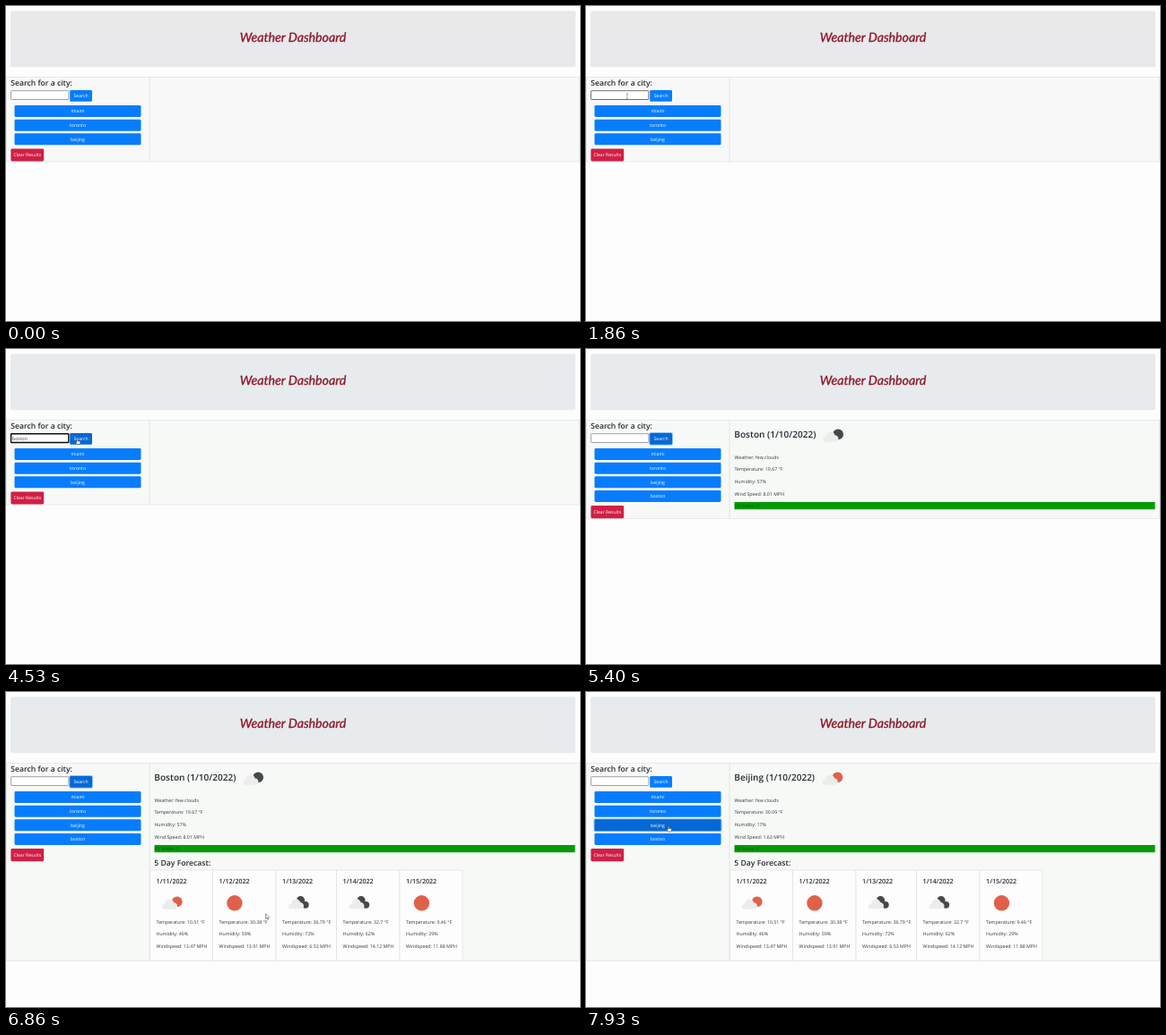
Write an HTML page that moves like this. It is 640 px wide and 352 px high and loops after 8000 ms.

```html
<!DOCTYPE html>
<html lang="en">
<head>
<meta charset="utf-8">
<title>Weather Dashboard</title>
<style>
  html, body { margin: 0; width: 100%; height: 100%; overflow: hidden; background: #fdfdfd; }
  svg { display: block; width: 100vw; height: 100vh; }
  text { font-family: "Open Sans", "Noto Sans", sans-serif; font-size: 5.25px; fill: #33383d; text-rendering: geometricPrecision; white-space: pre; }
  .title { font: italic 400 14.2px Lato, sans-serif; fill: #8d1a2b; stroke: #8d1a2b; stroke-width: .35; text-anchor: middle; }
  .h { font-weight: 600; fill: #262b30; }
  .btn { font-size: 5.1px; fill: #fff; text-anchor: middle; }
</style>
</head>
<body>
<svg id="stage" viewBox="0 0 640 352" preserveAspectRatio="none"></svg>
<script>
const LOOP = 8000;
const BLUE = [7, 125, 254], DEEP = [5, 104, 214];
const SUN = '#e0614a', DARK = '#47484b';

// Moments of the session, in ms
const T = {
  tint: 2130, inputHover: 1700, focus: 1930, searchHover: 4330, submit: 4900,
  current: 5130, forecast: 5530, icons: 5860, bostonHover: 7260, beijingHover: 7390,
  pick: 7530, beijing: 7660
};
const KEYS = [2860, 2930, 3060, 3130, 3260, 3400];
const CITIES = ['miami', 'toronto', 'beijing', 'boston'];
const NOW = {
  boston: { name: 'Boston', temp: '19.67', hum: 57, wind: '8.01', disc: DARK },
  beijing: { name: 'Beijing', temp: '30.09', hum: 17, wind: '1.63', disc: SUN }
};
const EDGES = [160.5, 230.5, 301, 368.5, 439, 509];
const DAYS = [
  ['10.51', 46, '13.47', 'few'], ['30.38', 59, '13.91', 'clear'], ['36.79', 72, '6.53', 'broken'],
  ['32.7', 62, '14.12', 'broken'], ['9.46', 29, '11.88', 'clear']
];

// Pointer stops: time, x, y
const PATHS = [
  [[760, 574, 2], [900, 560, 15], [1040, 530, 40], [1260, 378, 80], [1400, 228, 97], [1700, 62, 100], [1900, 42, 101]],
  [[4130, 42, 101], [4400, 78, 101], [4530, 79.5, 100], [5060, 80, 100], [5220, 96, 112]],
  [[5560, 165, 150], [5900, 225, 178], [6200, 231, 180], [6400, 262, 208], [6660, 318, 252],
   [6860, 290, 248], [7100, 165, 205], [7260, 100, 168], [7400, 91.8, 150], [8000, 92, 149.5]]
];

const text = (x, y, s, cls = '', size = 0, extra = '') =>
  `<text x="${x}" y="${y}" class="${cls}"${size ? ` style="font-size:${size}px"` : ''} ${extra}>${s}</text>`;
const rect = (x, y, w, h, fill, extra = '') =>
  `<rect x="${x}" y="${y}" width="${w}" height="${h}" fill="${fill}" ${extra}/>`;
const disc = (x, y, r, fill) => `<circle cx="${x}" cy="${y}" r="${r}" fill="${fill}"/>`;
const clamp = v => Math.max(0, Math.min(1, v));
const fade = (t, from) => clamp((t - from) / 150);
const blue = p => `rgb(${BLUE.map((c, i) => Math.round(c + (DEEP[i] - c) * p))})`;

function button(x, y, w, h, label, fill, ring) {
  const halo = ring ? rect(x - 1, y - 1, w + 2, h + 2, '#268fff', 'rx="2.2" opacity=".5"') : '';
  return halo + rect(x, y, w, h, fill, 'rx="1.4"') + text(x + w / 2, y + h / 2 + 1.9, label, 'btn');
}

function cloud(fill) {
  return `<path fill="${fill}" d="M-7.6 7C-12 7-12.300 1.200-7.600.6C-7-5.600 1-6 2.400-.4C7.300-.6 7.300 7 2.800 7Z"/>`;
}

function icon(x, y, kind, color = SUN) {
  const shapes = {
    clear: () => disc(0, 0, 8.7, color),
    few: () => disc(5.8, -1.5, 5.9, color) + cloud('#ececec'),
    broken: () => disc(3, -3, 4.7, DARK) + disc(8.4, 2, 3.9, DARK) +
      `<g stroke="#fdfdfd" stroke-width=".8">${cloud('#ececec')}</g>`
  };
  return `<g transform="translate(${x} ${y})">${shapes[kind]()}</g>`;
}

function header(t) {
  return rect(5, 5.5, 630, 62.7, t < T.tint ? 'url(#grey)' : '#e7ebee', 'rx="2"') +
    text(320, 40.3, 'Weather Dashboard', 'title');
}

function panels(t) {
  const bottom = t < T.submit ? 174 : t < T.forecast ? 189.5 : 300.5;
  const fill = t < T.tint ? '#f8f8f8' : '#f7f9f6';
  const line = 'stroke="#dfe3e3" stroke-width=".7"';
  return rect(.4, 79.5, 159.7, bottom - 79.5, fill, line) +
    rect(160.1, 79.5, 479.5, bottom - 79.5, fill, line);
}

function input(t) {
  const focused = t >= T.focus && t < T.submit;
  const stroke = focused ? '#0c0c0c' : t >= T.inputHover && t < T.focus ? '#404040' : '#858585';
  const typed = t < T.submit ? KEYS.filter(k => t >= k).length : 0;
  const caretOn = focused && t < 4400 && (t < 2400 || (t >= 2860 && t < 3460) || t >= 3930);
  const word = 'boston'.slice(0, typed);
  const caret = caretOn ? '<tspan font-weight="300" fill="#222" dx="-.5">|</tspan>' : '';
  return rect(5.6, 94.7, 64.2, 9.800, '#fff', `rx=".6" stroke="${stroke}" stroke-width="${focused ? 1.4 : .75}"`) +
    text(7, 101.6, word + caret, '', 5.15);
}

function sidebar(t) {
  const added = t >= T.submit;
  const searchFocus = added && t < T.pick;
  const searchDark = t < T.pick ? fade(t, T.searchHover) : 1 - fade(t, T.pick);
  const dark = {
    boston: fade(t, T.bostonHover) * (1 - fade(t, T.beijingHover + 20)),
    beijing: fade(t, T.beijingHover + 20)
  };
  const list = CITIES.slice(0, added ? 4 : 3).map((c, i) =>
    button(9.5, 111 + i * 15.65, 141, 13, c, blue(dark[c] || 0), c === 'beijing' && t >= T.pick)).join('');
  return text(5.300, 89, 'Search for a city:', 'h', 8.6) + input(t) +
    button(71.2, 94, 24.800, 12.800, 'Search', blue(searchDark), searchFocus) + list +
    button(5.4, added ? 175.1 : 159.4, 36.8, 14.1, 'Clear Results', '#d01f45');
}

function current(t) {
  if (t < T.current) return '';
  const w = t < T.beijing ? NOW.boston : NOW.beijing;
  const rows = ['Weather: few clouds', `Temperature: ${w.temp} °F`, `Humidity: ${w.hum}%`, `Wind Speed: ${w.wind} MPH`];
  return text(165.3, 99.2, `${w.name} (1/10/2022)`, 'h', 10.05) +
    icon(w === NOW.boston ? 275.3 : 274.6, 96.8, 'few', w.disc) +
    rows.map((s, i) => text(165.5, 122.700 + i * 13.6, s)).join('') +
    rect(165.5, 171, 469, 8.2, '#049b07') +
    text(165.5, 177, 'UV Index: 0', '', 0, 'style="fill:#0b4d10"');
}

function forecast(t) {
  if (t < T.forecast) return '';
  return text(165.3, 194, '5 Day Forecast:', 'h', 8.65) + DAYS.map(([temp, hum, wind, kind], i) => {
    const x = EDGES[i], tx = x + 7.1;
    return rect(x, 199, EDGES[i + 1] - x, 101.3, '#fdfdfd', 'stroke="#dedfdf" stroke-width=".7"') +
      text(tx, 214, `1/${11 + i}/2022`, 'h', 7.15) +
      (t >= T.icons ? icon(x + 24.4, 235.8, kind) : '') +
      [`Temperature: ${temp} °F`, `Humidity: ${hum}%`, `Windspeed: ${wind} MPH`]
        .map((s, j) => text(tx, 258.700 + j * 13.6, s)).join('');
  }).join('');
}

function pointer(t) {
  const path = PATHS.find(p => t >= p[0][0] && t <= p[p.length - 1][0]);
  if (!path) return '';
  const i = Math.max(1, path.findIndex(p => p[0] >= t));
  const [a, b] = [path[i - 1], path[i]];
  const p = clamp((t - a[0]) / (b[0] - a[0]));
  const x = a[1] + (b[1] - a[1]) * p, y = a[2] + (b[2] - a[2]) * p;
  const overInput = x > 5 && x < 70 && y > 94 && y < 105;
  const overButton = (x >= 71 && x < 96 && y > 94 && y < 107) || (x > 9 && x < 151 && y > 142 && y < 171 && t > 7000);
  const shape = overInput
    ? '<path d="M-1-3H1M0-3V3M-1 3H1" fill="none" stroke="#555" stroke-width=".5"/>'
    : overButton
      ? '<path d="M-.6.6Q0-.3.600.6V2.700L3 3.200Q3.700 3.500 3.500 4.500L2.800 6.600H-.4L-2 4.300Q-1.700 3.500-.6 4.200Z" fill="#fff" stroke="#222" stroke-width=".5"/>'
      : '<path d="M0 0V5.600L1.300 4.400 2.200 6.400 3.100 6 2.300 4.100H4Z" fill="#fff" stroke="#333" stroke-width=".5"/>';
  return `<g transform="translate(${x} ${y})">${shape}</g>`;
}

const stage = document.getElementById('stage');
const defs = '<defs><linearGradient id="grey" x2="0" y2="1"><stop stop-color="#e9e9e9"/>' +
  '<stop offset=".3" stop-color="#e9e9ea"/><stop offset=".5" stop-color="#e8e8ed"/></linearGradient></defs>';

function render(t) {
  stage.innerHTML = defs + rect(0, 0, 640, 352, '#fdfdfd') + header(t) + panels(t) +
    sidebar(t) + current(t) + forecast(t) + pointer(t);
}

const start = performance.now();
function tick() {
  render((performance.now() - start) % LOOP);
  requestAnimationFrame(tick);
}
tick();
</script>
</body>
</html>
```
